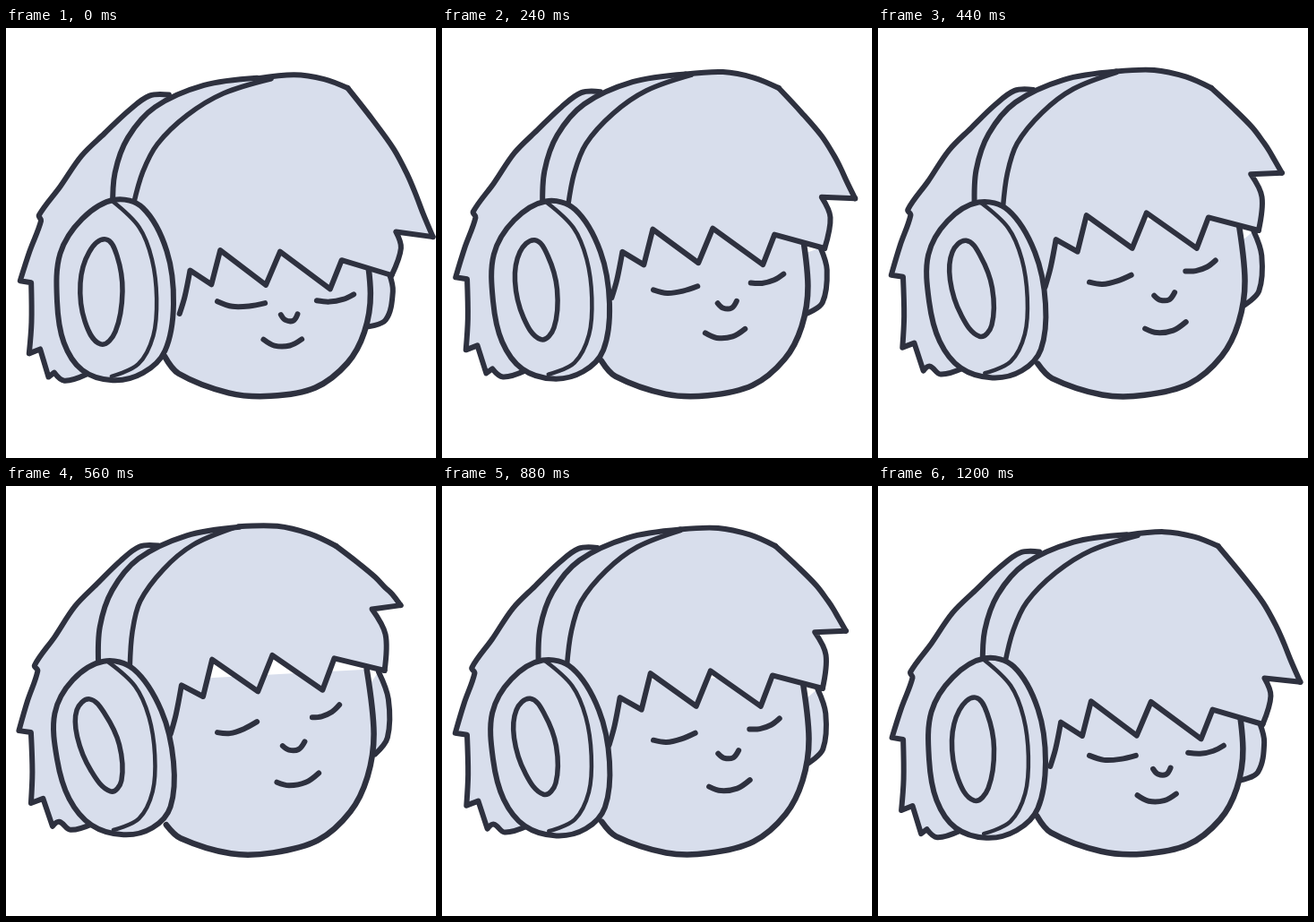
An HTML page with a canvas that plays this animation: 480x480 px, repeating every 1280 ms.

```html
<!DOCTYPE html>
<html>
<head>
<meta charset="utf-8">
<style>
  html, body { margin: 0; height: 100%; overflow: hidden; background: #fff; }
  canvas { display: block; }
</style>
</head>
<body>
<canvas id="stage" width="480" height="480"></canvas>
<script>
const ctx = document.getElementById('stage').getContext('2d');
const LOOP = 1280, HOLD = 80;
const INK = '#2e313f', FILL = '#d8deec';

const coords = s => s.split(' ').map(p => p.split(',').map(Number));

// A line in the middle pose, and how far its two ends travel as the head nods up.
// For a closed line the ends are its top and its bottom.
function part(travel, points, closed = false) {
  const [from, to] = coords(travel), base = coords(points);
  return lift => base.map((p, i) => {
    const t = closed ? (1 - Math.cos(2 * Math.PI * i / base.length)) / 2 : i / (base.length - 1);
    return p.map((v, c) => v + lift * (from[c] + (to[c] - from[c]) * t));
  });
}

const parts = {
  ear: part('-12,-67 9,-34', '421,236 429,262 425,300 408,314'),
  face: part('2,12 4,-24', '178,373 194,390 250,409 297,410 347,398 383,368 402,331 409,285 401,215'),
  back: part('-12,-8 8,-10', '175,70 154,71 132,87 105,113 80,138 57,172 34,204 37,210 25,244 ' +
    '15,277 28,279 29,323 27,358 40,353 50,384 57,379 69,388 94,381'),
  band: part('-16,-3 -20,-10', '110,200 112,159 126,119 156,84 210,59 269,50'),
  bandFront: part('-4,5 -42,-10', '140,200 146,162 158,129 187,95 223,69 272,51'),
  crown: part('-22,-11 -13,0', '269,50 311,48 346,55 374,67'),
  side: part('-13,0 -36,-100', '374,67 399,92 421,116 434,135 441,147 447,159 456,176'),
  tuft: part('-36,-100 -8,-70', '456,176 420,176 431,200 426,236'),
  fringe: part('-8,-70 -10,-42', '426,236 370,221 357,255 301,215 285,254 234,217 224,257 ' +
    '200,243 194,274 188,295'),
  cup: part('-12,4 12,-4', '114,194 79,215 57,253 57,305 68,350 91,380 126,391 159,383 ' +
    '181,359 187,308 176,250 147,203', true),
  rim: part('-6,2 2,-5', '116,195 146,223 161,258 167,301 164,342 148,373 119,386'),
  hole: part('-18,2 11,-12', '101,237 85,250 81,282 92,322 112,346 126,333 128,291 116,254', true),
  eyeLeft: part('0,-30 -9,-44', '236,288 251,291 268,288 284,282'),
  eyeRight: part('-5,-46 -16,-53', '344,278 356,278 369,274 379,267'),
  nose: part('2,-30 8,-34', '308,303 314,308 324,308 330,300'),
  mouth: part('15,-17 19,-27', '296,338 309,343 327,341 341,332')
};

// Unit tangent at point i; zero at open ends and at sharp corners.
function tangent(pts, i, closed) {
  const n = pts.length;
  if (!closed && (i === 0 || i === n - 1)) return [0, 0];
  const [ax, ay] = pts[(i + n - 1) % n], [x, y] = pts[i], [bx, by] = pts[(i + 1) % n];
  const dot = (x - ax) * (bx - x) + (y - ay) * (by - y);
  const cos = dot / (Math.hypot(x - ax, y - ay) * Math.hypot(bx - x, by - y));
  if (!closed && cos < 0.3) return [0, 0];
  const len = Math.hypot(bx - ax, by - ay);
  return [(bx - ax) / len, (by - ay) / len];
}

function trace(path, pts, { closed = false, join = false } = {}) {
  const n = pts.length;
  path[join ? 'lineTo' : 'moveTo'](...pts[0]);
  for (let i = 0; i < (closed ? n : n - 1); i++) {
    const j = (i + 1) % n, [x, y] = pts[i], [X, Y] = pts[j];
    const k = Math.hypot(X - x, Y - y) / 3;
    const [tx, ty] = tangent(pts, i, closed), [TX, TY] = tangent(pts, j, closed);
    path.bezierCurveTo(x + tx * k, y + ty * k, X - TX * k, Y - TY * k, X, Y);
  }
  if (closed) path.closePath();
  return path;
}

function line(width, pts, closed) {
  ctx.lineWidth = width;
  ctx.stroke(trace(new Path2D(), pts, { closed }));
}

function fill(...runs) {
  const path = new Path2D();
  runs.forEach((pts, i) => trace(path, pts, { join: i > 0 }));
  ctx.fill(path);
}

function draw(lift) {
  const now = {};
  for (const name in parts) now[name] = parts[name](lift);

  ctx.fillStyle = '#fff';
  ctx.fillRect(0, 0, 480, 480);
  ctx.fillStyle = FILL;
  ctx.strokeStyle = INK;
  ctx.lineCap = ctx.lineJoin = 'round';

  fill(now.ear, [[380, 260]]);
  line(6, now.ear);
  fill(now.face, [[120, 220]]);
  line(6.5, now.face);

  const outline = [now.crown, now.side, now.tuft, now.fringe];
  fill([...now.back].reverse(), now.band.slice(3), ...outline);
  for (const pts of [now.back, ...outline]) line(6, pts);
  line(6, now.band);
  line(5.5, now.bandFront);

  ctx.fill(trace(new Path2D(), now.cup, { closed: true }));
  line(6, now.cup, true);
  line(4.5, now.rim);
  line(5.5, now.hole, true);

  for (const name of ['eyeLeft', 'eyeRight', 'nose', 'mouth']) line(6, now[name]);
}

const start = performance.now();
function tick() {
  const step = Math.floor((performance.now() - start) % LOOP / HOLD);
  draw((4 - Math.abs(step - 8)) / 7); // nod up for eight drawings, then back down
  requestAnimationFrame(tick);
}
tick();
</script>
</body>
</html>
```
